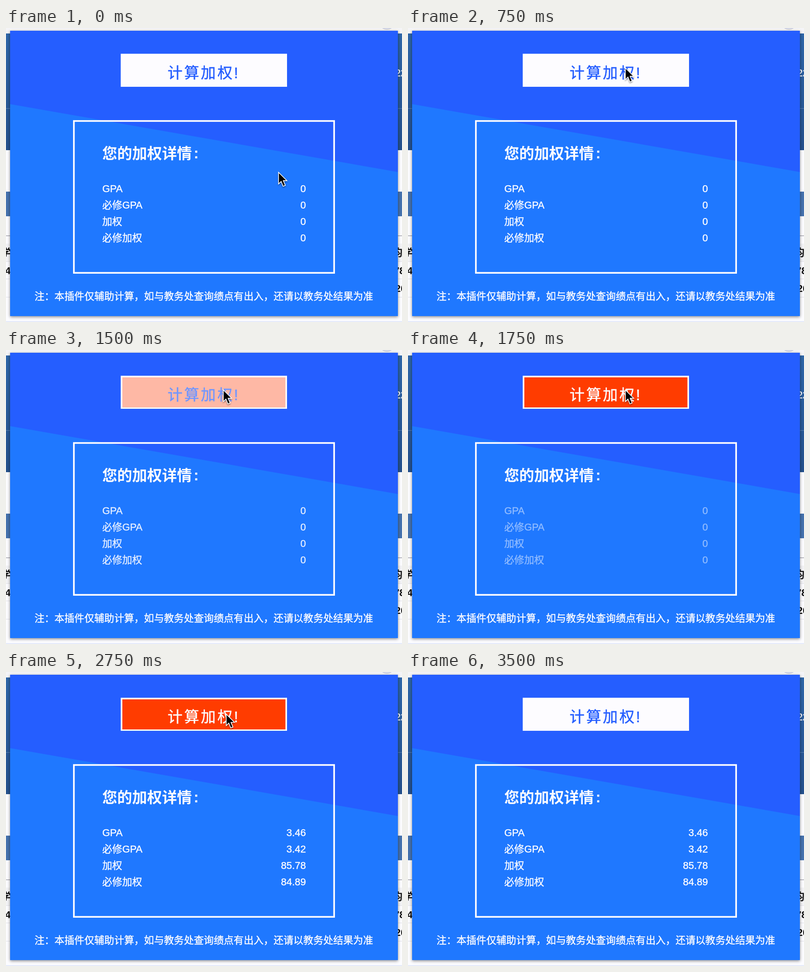
An HTML page that plays this animation: 868x645 px, repeating every 4080 ms.

```html
<!DOCTYPE html>
<html lang="zh-CN">
<head>
<meta charset="utf-8">
<title>计算加权</title>
<style>
  html, body { margin: 0; width: 100%; height: 100%; overflow: hidden; background: #fcfcff; }
  svg { display: block; width: 868px; height: 645px; }
  text { font-family: "Liberation Sans", "Noto Sans CJK SC", "Noto Sans CJK", sans-serif; white-space: pre; }
  .small { font-size: 21.84px; fill: #fdfcff; stroke: #fdfcff; stroke-width: .45; }
  .page { font-size: 22px; font-weight: 700; fill: #111; }
  .popup { filter: drop-shadow(0 2px 3px rgba(0, 0, 0, .45)); }
  #label { stroke-width: .5; }
  #cursor { filter: drop-shadow(0 2px 1.5px rgba(0, 0, 0, .4)); }
</style>
</head>
<body>
<svg viewBox="0 0 868 645" xmlns="http://www.w3.org/2000/svg">
  <defs>
    <linearGradient id="banner" x1="0" y1="0" x2="0" y2="1">
      <stop offset="0" stop-color="#2e66a8"/>
      <stop offset="1" stop-color="#24508c"/>
    </linearGradient>
  </defs>

  <!-- page behind the popup -->
  <rect width="868" height="645" fill="#fcfcff"/>
  <rect width="868" height="12" fill="#f4f4f7"/>
  <circle cx="835" cy="-14" r="17" fill="#d9dcec" stroke="#b9bccb"/>
  <rect y="12" width="868" height="256" fill="url(#banner)"/>
  <rect y="176" width="868" height="1" fill="#5b83b5"/>
  <rect y="359" width="868" height="54" fill="#4572ae"/>
  <rect y="455" width="868" height="1.5" fill="#a5a5ad"/>
  <rect y="473" width="868" height="39" fill="#f3f3f6"/>
  <path d="M0 512.5H868M0 550.5H868M0 590.5H868" stroke="#dfdfe6"/>
  <rect y="643" width="868" height="2" fill="#e3e9fb"/>
  <text class="page" x="-11" y="500">学</text>
  <text class="page" x="-2" y="540">4</text>
  <text class="page" x="847" y="500">均</text>
  <text class="page" x="850" y="540">78</text>
  <text class="page" x="853" y="579">20</text>
  <text class="small" x="853" y="106">22</text>

  <!-- popup -->
  <rect class="popup" x="9" y="6" width="850" height="626" fill="#1f78ff"/>
  <path d="M9 6H859V316L9 167Z" fill="#255eff"/>
  <rect x="251.5" y="56.5" width="364.5" height="72.5" fill="#fdfcff"/>
  <rect id="face" x="255" y="60" width="357.5" height="66"/>
  <text id="label" x="354.3" y="109.7" font-size="32.76" letter-spacing="3.64">计算加权!</text>
  <rect x="148.8" y="204" width="570.4" height="333.2" fill="none" stroke="#fdfcff" stroke-width="3.64"/>
  <g fill="#fdfcff" font-size="32.76" font-weight="700">
    <text x="211" y="286.7">您的加权详情</text>
    <text x="417" y="286" text-anchor="middle">:</text>
  </g>
  <g id="rows"></g>
  <text class="small" x="62.5" y="595.5">注：本插件仅辅助计算，如与教务处查询绩点有出入，还请以教务处结果为准</text>

  <path id="cursor" d="M1.2 2.6V24.2L6.4 19.3L10.8 30.2L14.2 28.8L9.7 18.1H16.8Z"
        fill="#000" stroke="#fff" stroke-width="3.2" paint-order="stroke"/>
</svg>
<script>
const $ = id => document.getElementById(id);
const LOOP = 4080;
const ROWS = [["GPA", "3.46"], ["必修GPA", "3.42"], ["加权", "85.78"], ["必修加权", "84.89"]];
const WHITE = [253, 252, 255], BLUE = [37, 94, 255], RED = [255, 60, 0];

const values = ROWS.map(([name], i) => {
  const add = (x, text, anchor) => {
    const el = document.createElementNS("http://www.w3.org/2000/svg", "text");
    el.setAttribute("class", "small");
    el.setAttribute("x", x);
    el.setAttribute("y", 359.8 + i * 36.1);
    el.setAttribute("text-anchor", anchor);
    el.textContent = text;
    return $("rows").appendChild(el);
  };
  add(211, name, "start");
  return add(657.3, "0", "end");
});

const part = (k, from, to) => Math.min(1, Math.max(0, (k - from) / (to - from)));
const smooth = p => p * p * (3 - 2 * p);
const easeOut = p => 1 - (1 - p) ** 4;
const lerp = (a, b, p) => a + (b - a) * p;
const mix = (a, b, p) => `rgb(${a.map((v, i) => Math.round(lerp(v, b[i], p)))})`;

// The picture advances twelve times a second, on whole hundredths
const stepStart = k => Math.round(k * 25 / 3) * 10;

function stepAt(t) {
  const k = Math.floor(t * .012) + 1;
  return stepStart(k) > t ? k - 1 : k;
}

function draw(now) {
  const k = stepAt(now % LOOP);

  const reach = smooth(part(k, 1, 9));
  const leave = part(k, 31, 39) ** 3;
  const x = lerp(597, 476, reach) + 400 * leave;
  const y = lerp(316, 87, reach) + 290 * leave;
  $("cursor").setAttribute("transform", `translate(${x} ${y})`);

  const heat = smooth(part(k, 16, 21)) - smooth(part(k, 35, 42));
  const ink = mix(BLUE, WHITE, heat);
  $("face").setAttribute("fill", mix(WHITE, RED, heat));
  $("label").setAttribute("fill", ink);
  $("label").setAttribute("stroke", ink);

  const loaded = k >= 26;
  const shown = loaded ? easeOut(part(k, 27, 32)) : 1 - smooth(part(k, 16, 26));
  $("rows").setAttribute("opacity", shown);
  values.forEach((el, i) => { el.textContent = loaded ? ROWS[i][1] : "0"; });
}

const start = performance.now();
function tick() {
  draw(performance.now() - start);
  requestAnimationFrame(tick);
}
tick();
</script>
</body>
</html>
```
